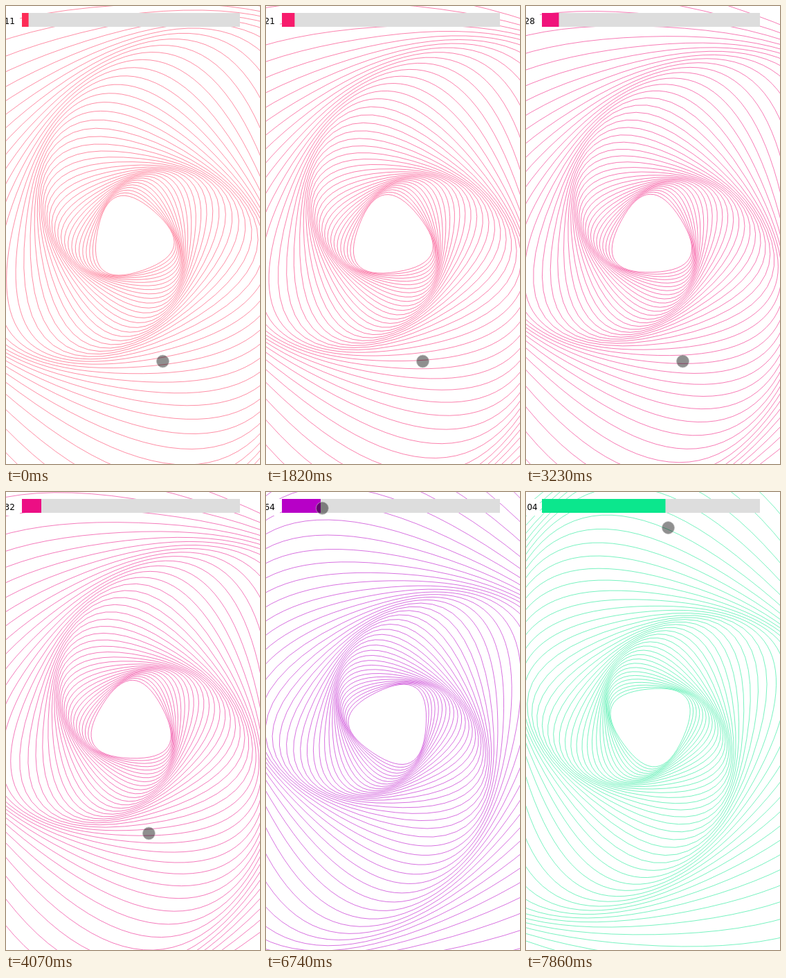
Write an HTML page that moves like this. It is 367 px wide and 660 px high and loops after 8000 ms.

```html
<!DOCTYPE html>
<html lang="en">
<head>
<meta charset="utf-8">
<title>Spiral slider</title>
<style>
  html, body { margin: 0; width: 100%; height: 100%; overflow: hidden; background: #fff; }
  svg { display: block; width: 367px; height: 660px; }
  #spiral { fill: none; stroke-width: .5; }
  #label { font: 12px "DejaVu Sans", sans-serif; text-anchor: middle; }
</style>
</head>
<body>
<svg viewBox="0 0 367 660">
  <path id="spiral"/>
  <rect y="10" width="20" height="24" fill="#fff"/>
  <rect x="23" y="10" width="315" height="20" fill="#ddd"/>
  <rect id="fill" x="23" y="10" height="20"/>
  <text id="label" x="5.2" y="26"></text>
  <circle id="touch" r="9" fill="#000" fill-opacity=".44" stroke="#bbb" stroke-opacity=".7"/>
</svg>
<script>
const LOOP = 8000, CX = 181.3, CY = 333.7, LINES = 41;
const TICK = 191, DRAG = 6470, STEP = 135;
const $ = id => document.getElementById(id);
const spiral = $('spiral'), fill = $('fill'), label = $('label'), touch = $('touch');

const progress = (t, from, to) => Math.min(1, Math.max(0, (t - from) / (to - from)));
const snap = t => DRAG + STEP * Math.floor((t - DRAG) / STEP);
const dragged = t => progress(t, DRAG, DRAG + 10 * STEP) ** 1.32;

// Rounded triangles, each 5% larger and 5 degrees further round than the last.
function spiralPath() {
  let d = '';
  for (let i = 0; i < LINES; i++) {
    const r = 100 * 1.05 ** i;
    const at = (deg, k) => {
      const a = (deg + 5 * i) * Math.PI / 180;
      return `${(r * k * Math.cos(a)).toFixed(2)} ${(r * k * Math.sin(a)).toFixed(2)}`;
    };
    d += `M${at(-60, .5)}`;
    for (let a = 0; a < 360; a += 120) d += `Q${at(a, 1)} ${at(a + 60, .5)}`;
    d += 'Z';
  }
  return d;
}

// Sine-squared rainbow
function colour(v) {
  const part = deg => Math.round(255 * Math.sin((deg + v / 2) * Math.PI / 180) ** 2);
  return `rgb(${part(90)},${part(150)},${part(210)})`;
}

// Slow count from 11 to 39, then the bar is dragged from 45 to 204.
function valueAt(t) {
  return t < DRAG
    ? 11 + Math.min(28, Math.round(t / TICK))
    : Math.round(45 + 159 * dragged(snap(t)));
}

// Rest, slide a little, swipe up to the bar, drag along it.
function touchAt(t) {
  const slide = progress(t, 3380, 4070);
  const drift = progress(t, 4070, 5350);
  const swipe = progress(t, 5500, 6190);
  const drag = dragged(t);
  return [
    226.5 - 21 * slide - 2 * drift - 139 * swipe + 141 * drag,
    512 - 21 * slide - 2.5 * drift - 469 * swipe + 32 * drag
  ];
}

function draw(t) {
  const v = valueAt(t), c = colour(v), [x, y] = touchAt(snap(t));
  spiral.setAttribute('transform', `translate(${CX} ${CY}) rotate(${v})`);
  spiral.setAttribute('stroke', c);
  fill.setAttribute('width', v * .875);
  fill.setAttribute('fill', c);
  label.textContent = v;
  touch.setAttribute('cx', x);
  touch.setAttribute('cy', y);
}

spiral.setAttribute('d', spiralPath());
const start = performance.now();
function loop() {
  draw((performance.now() - start) % LOOP);
  requestAnimationFrame(loop);
}
loop();
</script>
</body>
</html>
```
